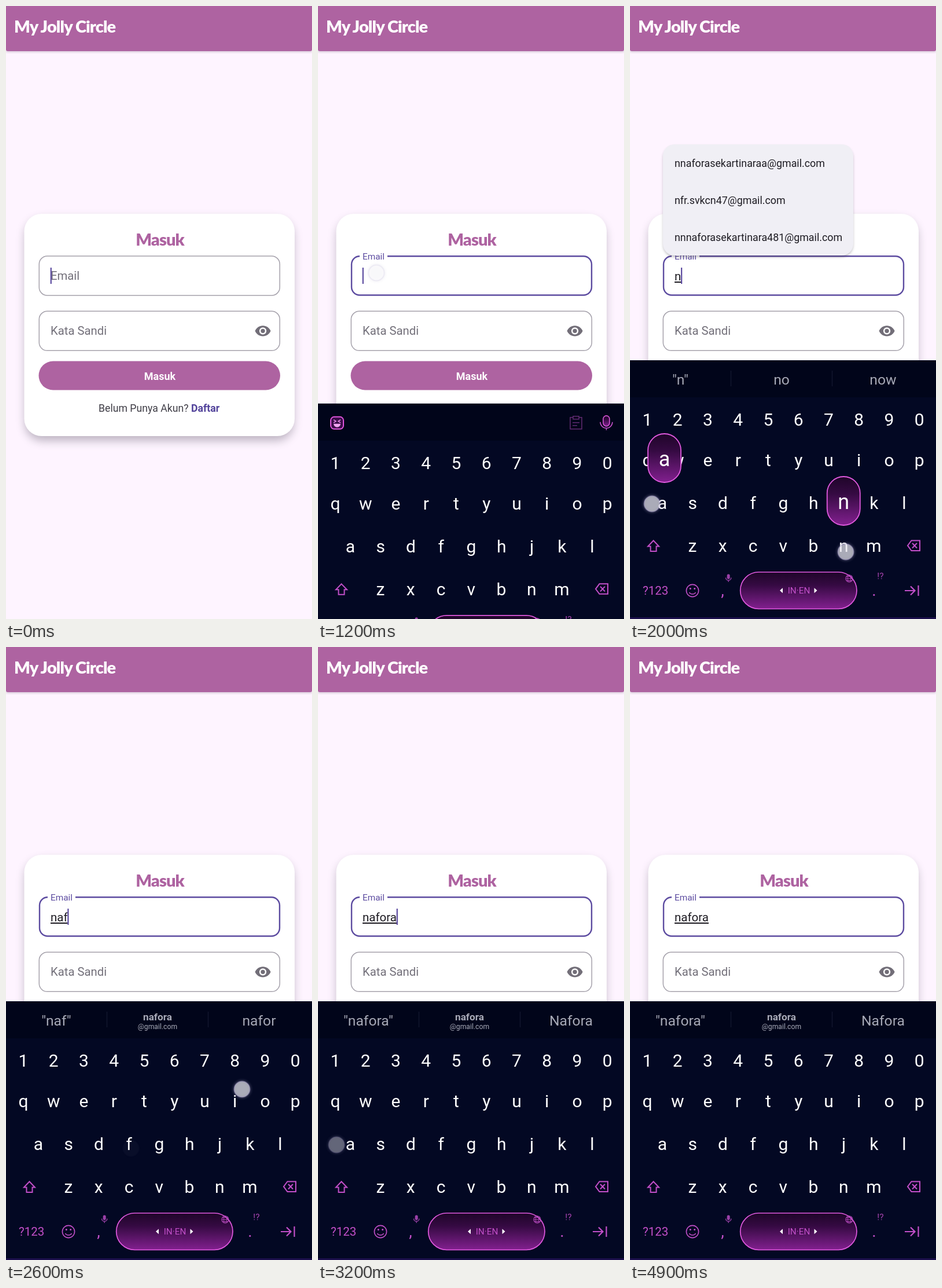
Animation, 529 px wide and 1059 px high, one loop 5 s. Source, as an HTML page:

```html
<!DOCTYPE html>
<html lang="id">
<head>
<meta charset="utf-8">
<title>Masuk</title>
<style>
html, body { margin: 0; width: 100%; height: 100%; overflow: hidden; background: #fef4ff; }
svg { display: block; width: 100vw; height: 100vh; }
text { font-family: Roboto, sans-serif; white-space: pre; }
.display { font-family: Lato, sans-serif; font-weight: 900; font-size: 29px; letter-spacing: -.9px; }
.mid { text-anchor: middle; }
.bold { font-weight: 700; }
.label { font-size: 20.3px; fill: #726f79; }
.line { fill: none; stroke: #a5a1ab; stroke-width: 1.5; }
.key { font-size: 30px; fill: #fff; }
.pink { fill: #c24fc9; }
.ico { fill: none; stroke: #c24fc9; stroke-width: 2; }
.hint { font-size: 24.7px; fill: #a6a8b5; }
.mail { font-size: 17.85px; fill: #1e1c23; }
</style>
</head>
<body>
<svg viewBox="0 0 529 1059" xmlns="http://www.w3.org/2000/svg">
  <defs>
    <linearGradient id="glow" x1="0" y1="0" x2="0" y2="1">
      <stop offset="0" stop-color="#1f0529"/>
      <stop offset=".35" stop-color="#350a42"/>
      <stop offset="1" stop-color="#82208f"/>
    </linearGradient>
    <filter id="soft" x="-20%" y="-20%" width="140%" height="150%"><feGaussianBlur stdDeviation="8"/></filter>
    <filter id="thin" x="-20%" y="-20%" width="140%" height="140%"><feGaussianBlur stdDeviation="2.5"/></filter>
  </defs>

  <rect width="529" height="1059" fill="#fef4ff"/>
  <rect y="66" width="529" height="13" fill="#6b5570" opacity=".35" filter="url(#thin)"/>
  <path d="M0 0H529V75q0 3-3 3H3q-3 0-3-3z" fill="#ae63a1"/>
  <text class="display" x="14" y="46" fill="#fff">My Jolly Circle</text>

  <rect x="33" y="368" width="464" height="383" rx="30" fill="#4a4255" opacity=".36" filter="url(#soft)"/>
  <rect x="31.5" y="359" width="467.5" height="384" rx="30" fill="#fff"/>
  <text class="display mid" x="266" y="414" fill="#ae63a1">Masuk</text>

  <rect class="line" id="idle" x="57.3" y="432" width="416" height="68" rx="14"/>
  <path id="focus" d="M120 432.3H459a14 14 0 0 1 14 14V485.500a14 14 0 0 1-14 14H72a14 14 0 0 1-14-14V446.300a14 14 0 0 1 14-14"
    fill="none" stroke="#5c4ba0" stroke-width="2.4"/>
  <text class="label" id="label" x="77">Email</text>
  <text id="typed" x="77" y="474" font-size="20.5" fill="#1e1c23"
    style="text-decoration:underline;text-decoration-thickness:1.4px;text-decoration-skip-ink:none"></text>
  <rect id="caret" y="452" width="2.2" height="28" fill="#5c4ba0"/>

  <rect class="line" x="57.3" y="527.300" width="416" height="68" rx="14"/>
  <text class="label" x="77" y="568">Kata Sandi</text>
  <path transform="translate(429.300 546.600) scale(1.23)" fill="#726e78" fill-rule="evenodd"
    d="M12 4.500C7 4.500 2.730 7.610 1 12c1.730 4.390 6 7.500 11 7.500s9.270-3.110 11-7.500c-1.730-4.390-6-7.500-11-7.500zM12 17a5 5 0 1 1 0-10a5 5 0 0 1 0 10zM12 9a3 3 0 1 0 0 6a3 3 0 0 0 0-6z"/>
  <rect x="56.500" y="613.500" width="417.500" height="50" rx="25" fill="#ae63a1"/>
  <text class="mid bold" x="266" y="645.500" font-size="18" fill="#fff">Masuk</text>
  <text x="160" y="700.500" font-size="17.7" fill="#3f3d46">Belum Punya Akun? <tspan class="bold" fill="#53449b">Daftar</tspan></text>

  <g id="board">
    <rect y="612" width="529" height="450" fill="#030823"/>
    <rect y="612" width="529" height="64" fill="#01051a"/>
    <rect y="1056" width="529" height="4" fill="#1b0f4b"/>
    <g id="tools">
      <rect x="22" y="635" width="22" height="21" rx="6" fill="#3b0d4a" stroke="#e055dd" stroke-width="2"/>
      <path d="M27 640l4 2.500-4 2.500M39 640l-4 2.500 4 2.500" fill="none" stroke="#e88be8" stroke-width="1.500"/>
      <path d="M27 647h12a6 6 0 0 1-12 0z" fill="#f2a5f2"/>
      <g class="ico" stroke-width="1.500" opacity=".5">
        <path d="M441 636h-5v20h20v-20h-5M441 634h10v5h-10zM440 645h12M440 650h8" style="stroke-width:1.5"/>
      </g>
      <rect x="493" y="633" width="11" height="18" rx="5.500" fill="url(#glow)" stroke="#d856d8" stroke-width="1.600"/>
      <path class="ico" d="M488 644a10.500 10.500 0 0 0 21 0M498.500 654.500V658" style="stroke-width:1.6"/>
    </g>
    <g id="hints">
      <path d="M174.500 630V657M349.500 630V657" stroke="#12172e" stroke-width="1.500"/>
      <text class="hint mid" id="h0" x="87" y="654"></text>
      <text class="hint mid" id="h1" x="262" y="654"></text>
      <g id="full">
        <text class="mid bold" x="262" y="645" font-size="17.200" fill="#a9abb8">nafora</text>
        <text class="mid" x="262" y="660" font-size="12.200" fill="#a9abb8">@gmail.com</text>
      </g>
      <text class="hint mid" id="h2" x="437.500" y="654"></text>
    </g>
    <g id="keys"></g>
    <path class="ico" d="M40.500 923.500L50 933.500H45.500V942H35.500V933.500H31z" stroke-width="2.300"/>
    <path class="ico" d="M486.500 923.500H501V941H486.500L480 932.200zM488 928l8 8.500M496 928l-8 8.500"/>
    <text class="pink" x="22" y="1017" font-size="20.500">?123</text>
    <g class="ico">
      <circle cx="108" cy="1010" r="10.600" style="stroke-width:1.6"/>
      <path d="M102.500 1013a6 5 0 0 0 11 0" style="stroke-width:1.6"/>
    </g>
    <g class="pink">
      <circle cx="104.300" cy="1006.500" r="1.500"/><circle cx="111.700" cy="1006.500" r="1.500"/>
      <text class="mid" x="160" y="1019" font-size="28">,</text>
      <text class="mid" x="422" y="1019" font-size="28">.</text>
      <text class="mid" x="433" y="990" font-size="15.500" opacity=".85">!?</text>
      <rect x="167.700" y="981.500" width="5" height="8.500" rx="2.500" opacity=".8"/>
    </g>
    <path class="ico" d="M165.500 987.500a4.700 4.700 0 0 0 9.400 0M170.200 992V995" style="stroke-width:1.4" opacity=".8"/>
    <path class="ico" d="M475 1010H492M485 1002.500l7.500 7.500-7.500 7.500M498.500 1001V1019" style="stroke-width:2.2"/>
    <rect x="190.700" y="978" width="201.300" height="63.500" rx="31.700" fill="url(#glow)" stroke="#e25ae0" stroke-width="1.700"/>
    <path d="M264 1005.200v9l-5-4.500zM318.500 1005.200v9l5-4.500z" fill="#fff"/>
    <text class="mid pink" x="292" y="1015" font-size="15.300">IN·EN</text>
    <g class="ico" opacity=".85">
      <path d="M373 989h12M374 985.500h10M374 992.500h10" style="stroke-width:1"/>
      <circle cx="379" cy="989" r="6" style="stroke-width:1.2"/>
      <ellipse cx="379" cy="989" rx="2.800" ry="6" style="stroke-width:1"/>
    </g>
    <g id="pops"></g>
  </g>

  <g id="menu">
    <rect x="58" y="4" width="327" height="190" rx="20" fill="#3a3545" opacity=".4" filter="url(#thin)"/>
    <rect x="57" width="329" height="192" rx="20" fill="#f0eff5"/>
    <text class="mail" x="77" y="38.500">nnaforasekartinaraa@gmail.com</text>
    <text class="mail" x="77" y="102.800">nfr.svkcn47@gmail.com</text>
    <text class="mail" id="third" x="77" y="167"></text>
  </g>
  <g id="dots"></g>
</svg>
<script>
const LOOP = 5000, NS = 'http://www.w3.org/2000/svg';
const $ = id => document.getElementById(id);
const clamp = v => Math.max(0, Math.min(1, v));
const ramp = (t, a, b) => clamp((t - a) / (b - a));
const out = p => 1 - (1 - p) ** 3;
const show = (el, on) => el.setAttribute('opacity', +on);

function add(parent, tag, attrs, text) {
  const el = document.createElementNS(NS, tag);
  for (const k in attrs) el.setAttribute(k, attrs[k]);
  if (text) el.textContent = text;
  return parent.appendChild(el);
}

// Keyboard rows: letters, first centre, baseline
const keyAt = {};
[['1234567890', 30, 725], ['qwertyuiop', 30, 795], ['asdfghjkl', 56, 869], ['zxcvbnm', 108, 943]]
  .forEach(([row, x0, y]) => [...row].forEach((ch, i) => {
    const x = x0 + i * 52.25;
    keyAt[ch] = { x, y };
    add($('keys'), 'text', { class: 'key mid', x, y }, ch);
  }));

// Each tap: place, press and release time, key and the time its balloon shows
const taps = [
  { x: 101, y: 461, down: 830, up: 1060 },
  { x: 373, y: 943, down: 1780, up: 2010, key: 'n', pop: 1800 },
  { x: 38, y: 860, down: 1940, up: 2090, key: 'a', pop: 1960 },
  { x: 216, y: 866, down: 2260, up: 2370, key: 'f', pop: 2280 },
  { x: 408, y: 764, down: 2560, up: 2690, key: 'o', pop: 2630 },
  { x: 192, y: 790, down: 2810, up: 2930, key: 'r', pop: 2830 },
  { x: 32, y: 860, down: 2980, up: 3100, key: 'a', pop: 2990 }
];

for (const tap of taps) {
  tap.dot = add($('dots'), 'g', {});
  add(tap.dot, 'circle', { cx: tap.x, cy: tap.y, r: 15, fill: '#aaa3c4', opacity: .4, filter: 'url(#thin)' });
  add(tap.dot, 'circle', { cx: tap.x, cy: tap.y, r: 13.5, fill: '#fff', 'fill-opacity': .55, stroke: '#b4aad2', 'stroke-opacity': .45, 'stroke-width': 2 });
  if (!tap.key) continue;
  const k = keyAt[tap.key], x = Math.max(59.5, k.x), top = k.y - 130;
  tap.balloon = add($('pops'), 'g', {});
  add(tap.balloon, 'rect', { x: x - 28.5, y: top, width: 57, height: 84, rx: 28.5, fill: 'url(#glow)', stroke: '#e25ae0', 'stroke-width': 1.8 });
  add(tap.balloon, 'text', { class: 'mid', x, y: top + 56, 'font-size': 36, fill: '#fff' }, tap.key);
}

// Typing steps: time, text, middle hint (empty = stored address), right hint
const steps = [
  [1060, ''],
  [1900, 'n', 'no', 'now'],
  [2100, 'na', 'nah', 'name'],
  [2400, 'naf', '', 'nafor'],
  [2700, 'nafo', '', 'nafor'],
  [2930, 'nafor', '', 'Nafora'],
  [3100, 'nafora', '', 'Nafora']
];

function draw(t) {
  const focus = out(ramp(t, 930, 1090));
  show($('idle'), 1 - focus);
  show($('focus'), focus);
  $('label').setAttribute('y', 473 - 35 * focus);
  $('label').style.fontSize = 20.3 - 4.9 * focus + 'px';
  $('label').style.fill = focus > .5 ? '#5c4ba0' : '#726f79';

  const step = steps.filter(s => s[0] <= t).pop();
  const [since, word, mid, right] = step || [0, ''];
  $('typed').textContent = word;
  const width = word ? $('typed').getComputedTextLength() : 0;
  $('caret').setAttribute('x', 76.7 + width);
  show($('caret'), step && (t - since) % 1000 < 500);

  show($('tools'), !word);
  show($('hints'), !!word);
  $('h0').textContent = word ? `"${word}"` : '';
  $('h1').textContent = mid || '';
  $('h2').textContent = right || '';
  show($('full'), word && !mid);

  const rise = out(ramp(t, 1120, 1300));
  show($('board'), rise > 0);
  $('board').setAttribute('transform', `translate(0 ${450 * (1 - rise)})`);

  show($('menu'), ramp(t, 1360, 1480) * (1 - ramp(t, 2100, 2220)));
  $('menu').setAttribute('transform', `translate(0 ${word ? 239 : 501.5})`);
  $('third').textContent = word ? 'nnnaforasekartinara481@gmail.com' : 'k641dnv7182@pendiru.academy';

  for (const tap of taps) {
    show(tap.dot, ramp(t, tap.down - 20, tap.down + 20) * (1 - ramp(t, tap.up, tap.up + 240)));
    if (tap.balloon) show(tap.balloon, t >= tap.pop && t < tap.up + 40);
  }
}

function tick() {
  draw(performance.now() % LOOP);
  requestAnimationFrame(tick);
}
tick();
</script>
</body>
</html>
```
